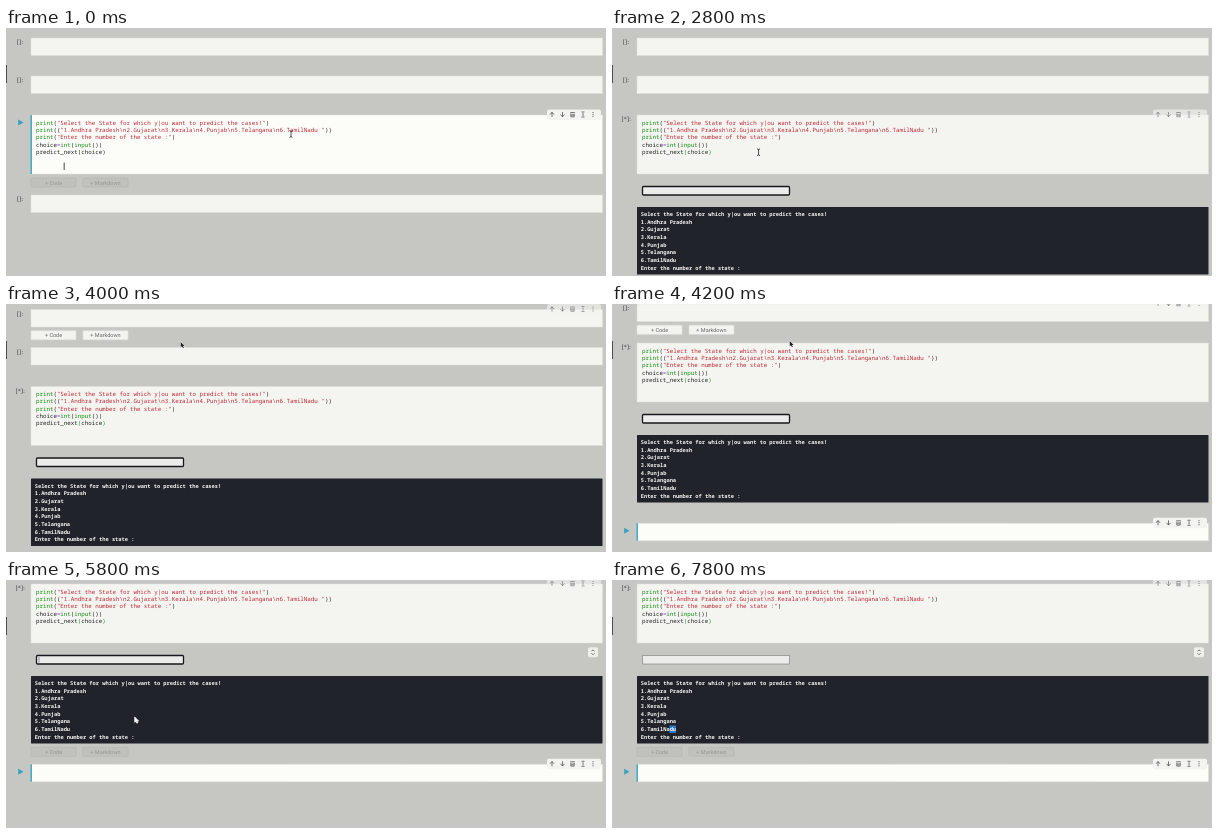
An HTML page with a canvas that plays this animation: 600x248 px, repeating every 8 s.

```html
<!DOCTYPE html>
<html lang="en">
<head>
<meta charset="utf-8">
<title>Notebook run</title>
<style>
html, body { margin: 0; width: 100%; height: 100%; overflow: hidden; background: #c6c6c3; }
canvas { display: block; width: 100%; height: 100%; }
</style>
</head>
<body>
<canvas id="stage" width="600" height="248"></canvas>
<script>
const ctx = document.getElementById('stage').getContext('2d');
const LOOP = 8000, STEP = 200;
const RUN = 2200, OUTPUT = 2800, UNFOCUS = 7800;
const MONO = '"Noto Sans Mono", "DejaVu Sans Mono", monospace';
const CODE_CHAR = 3.482, OUT_CHAR = 3.224;
const GREEN = '#128a12', RED = '#bb2838', INK = '#222', TEAL = '#35a3c0';

const code = [
  [['print', GREEN], ['(', INK], ['"Select the State for which y|ou want to predict the cases!"', RED], [')', INK]],
  [['print', GREEN], ['((', INK], ['"1.Andhra Pradesh\\n2.Gujarat\\n3.Kerala\\n4.Punjab\\n5.Telangana\\n6.TamilNadu "', RED], ['))', INK]],
  [['print', GREEN], ['(', INK], ['"Enter the number of the state :"', RED], [')', INK]],
  [['choice', INK], ['=', '#a22fe0'], ['int', GREEN], ['(', INK], ['input', GREEN], ['())', INK]],
  [['predict_next', INK], ['(', 'bracket'], ['choice', INK], [')', 'bracket']]
];
const output = ['Select the State for which y|ou want to predict the cases!', '1.Andhra Pradesh', '2.Gujarat',
  '3.Kerala', '4.Punjab', '5.Telangana', '6.TamilNadu', 'Enter the number of the state :'];

// Rows of time followed by values
const scrollKeys = [[0, 0], [3800, 0], [4000, 4.5], [4200, 48], [4400, 83]];
const mouseKeys = [[0, 285, 106], [200, 285, 106], [1400, 145, 125], [3200, 147, 124], [3800, 172, 48],
  [4000, 176, 41], [4200, 179, 40], [5000, 179, 40], [5400, 287, 14], [5800, 130, 140],
  [6200, 66, 147], [6800, 287, 14], [7600, 287, 20]];

function at(keys, t) {
  const i = keys.findIndex(k => k[0] > t);
  if (i < 0) return keys[keys.length - 1].slice(1);
  const a = keys[i - 1], b = keys[i], f = (t - a[0]) / (b[0] - a[0]);
  return a.slice(1).map((v, j) => v + (b[j + 1] - v) * f);
}

function box(x, y, w, h, fill, r = 0, stroke, line = 1) {
  ctx.beginPath();
  ctx.roundRect(x, y, w, h, r);
  if (fill) { ctx.fillStyle = fill; ctx.fill(); }
  if (stroke) { ctx.strokeStyle = stroke; ctx.lineWidth = line; ctx.stroke(); }
}

function text(str, x, y, font, color, align = 'left') {
  ctx.font = font;
  ctx.fillStyle = color;
  ctx.textAlign = align;
  ctx.fillText(str, x, y);
}

function path(d, x, y, stroke, fill, line = 0.8) {
  const p = new Path2D(d);
  ctx.save();
  ctx.translate(x, y);
  ctx.lineWidth = line;
  if (stroke) { ctx.strokeStyle = stroke; ctx.stroke(p); }
  if (fill) { ctx.fillStyle = fill; ctx.fill(p); }
  ctx.restore();
}

function cell(y, h, label, selected) {
  box(25, y, 571.5, h, selected ? '#fcfdf9' : '#f4f5f1', 0.5, '#deded9', 0.5);
  if (selected) {
    box(24.5, y, 1.4, h, TEAL);
    path('M-2.3-3L3 0L-2.3 3Z', 14.5, y + 7.5, null, TEAL);
  } else {
    text(label, label.length > 3 ? 9.5 : 10.8, y + 6.2, '5.8px "DejaVu Sans", sans-serif', '#3c3c3c');
  }
}

function toolbar(cellTop, faded) {
  const y = cellTop - 0.5, ink = '#555';
  ctx.globalAlpha = faded ? 0.65 : 1;
  box(541, y - 5, 54, 10.5, '#f3f3f0', 2);
  path('M0 2.5V-2.2M-2 0L0-2.3L2 0', 546, y, ink);
  path('M0-2.5V2.2M-2 0L0 2.3L2 0', 556.5, y, ink);
  path('M-2.3-2H2.3M-1.7-1V2.3H1.7V-1M-.6-.5V1.5M.6-.5V1.5', 566.5, y, ink);
  path('M-1.5-2.5H1.5M-1.5 2.5H1.5M0-1.5V1.5', 577, y, ink);
  path('M-.5-2.5h1v1h-1zM-.5-.5h1v1h-1zM-.5 1.5h1v1h-1z', 587, y, null, ink);
  ctx.globalAlpha = 1;
}

function addButtons(y, faded) {
  const font = '5.5px Roboto, sans-serif', ink = faded ? '#969694' : '#666';
  for (const [x, label] of [[25, '+ Code'], [77, '+ Markdown']]) {
    box(x, y, 45, 9, faded ? '#c0c0bd' : '#f3f3f0', 0.5, faded ? '#b4b4b1' : '#e0e0dd', 0.6);
    text(label, x + 22.5, y + 6.5, font, ink, 'center');
  }
}

function drawCode(top, t) {
  code.forEach((line, row) => {
    let col = 0;
    for (const [str, color] of line) {
      const ink = color !== 'bracket' ? color : t >= 1400 ? '#1b8f2c' : INK;
      text(str, 30 + col * CODE_CHAR, top + 9.5 + row * 7.35, `5.803px ${MONO}`, ink);
      col += str.length;
    }
  });
  if (t < 1200) box(57.7, top + 47.5, 0.9, 7.5, '#333');
  else if (t < RUN) box(99.8, top + 33.5, 0.8, 7.5, '#333');
}

function drawOutput(scroll, t) {
  const top = 179 - scroll, focused = t < UNFOCUS;
  box(30.5, 158.5 - scroll, 147, 8.5, '#ececea', focused ? 1 : 0, focused ? '#17181b' : '#777', focused ? 1.3 : 0.6);
  if (focused && t % 1200 > 700) box(32.7, 160 - scroll, 0.6, 5.5, '#555');
  box(25, top, 571.5, 67.5, '#20232a', 0.5);
  if (!focused) box(28.5 + 9 * OUT_CHAR, top + 49.5, 2 * OUT_CHAR, 7.5, '#2b78cc');
  output.forEach((str, row) =>
    text(str, 28.7, top + 9.1 + row * 7.65, `600 5.373px ${MONO}`, '#f4f4f2'));
}

function pointer(x, y, t) {
  if (t < 3400) {
    path('M-1.5-3.3Q0-3.3 0-2.3Q0-3.3 1.5-3.3M0-2.3V2.3M-1.5 3.3Q0 3.3 0 2.3Q0 3.3 1.5 3.3', x, y, '#222', null, 0.8);
  } else {
    path('M-1.3-3V2.3L0 1.2L.9 3.2L1.8 2.8L1 .9H2.6Z', x, y, '#fff', t >= 5800 && y > 95 ? '#f4f4f4' : '#222', 0.8);
  }
}

function draw(t) {
  const [scroll] = at(scrollKeys, t);
  const ran = t >= RUN, shown = t >= OUTPUT;
  const tops = [10, 48, 87, shown ? 267.3 : 167].map(y => y - scroll);
  const hover = t < 4000 ? 2 : t < 4200 ? 0 : t < 4400 ? 1 : 2;

  box(0, 0, 600, 248, '#c6c6c3');
  box(0, 37, 1, 18, '#4c4c4c');
  tops.forEach((y, i) =>
    cell(y, i === 2 ? 59 : 17.5, ran && i === 2 ? '[*]:' : '[]:', i === (ran ? 3 : 2)));
  drawCode(tops[2], t);
  if (shown) drawOutput(scroll, t);

  if (hover < 2) addButtons(tops[hover] + 21.3, false);
  else if (!ran) addButtons(150, true);
  else if (t >= 4400) addButtons(250.3 - scroll, true);

  toolbar(tops[hover], ran);
  if (ran) toolbar(tops[3], false);
  if (t >= 4400) {
    box(582, 67.3, 10, 10, '#eeeeeb', 2);
    path('M-1.5-1L0-2.5L1.5-1M-1.5 1L0 2.5L1.5 1', 587, 72.3, '#555');
  }
  if (t < UNFOCUS) pointer(...at(mouseKeys, t), t);
}

ctx.textRendering = 'geometricPrecision';
function frame() {
  const t = performance.now() % LOOP;
  draw(Math.floor(t / STEP) * STEP);
  requestAnimationFrame(frame);
}
frame();
</script>
</body>
</html>
```
